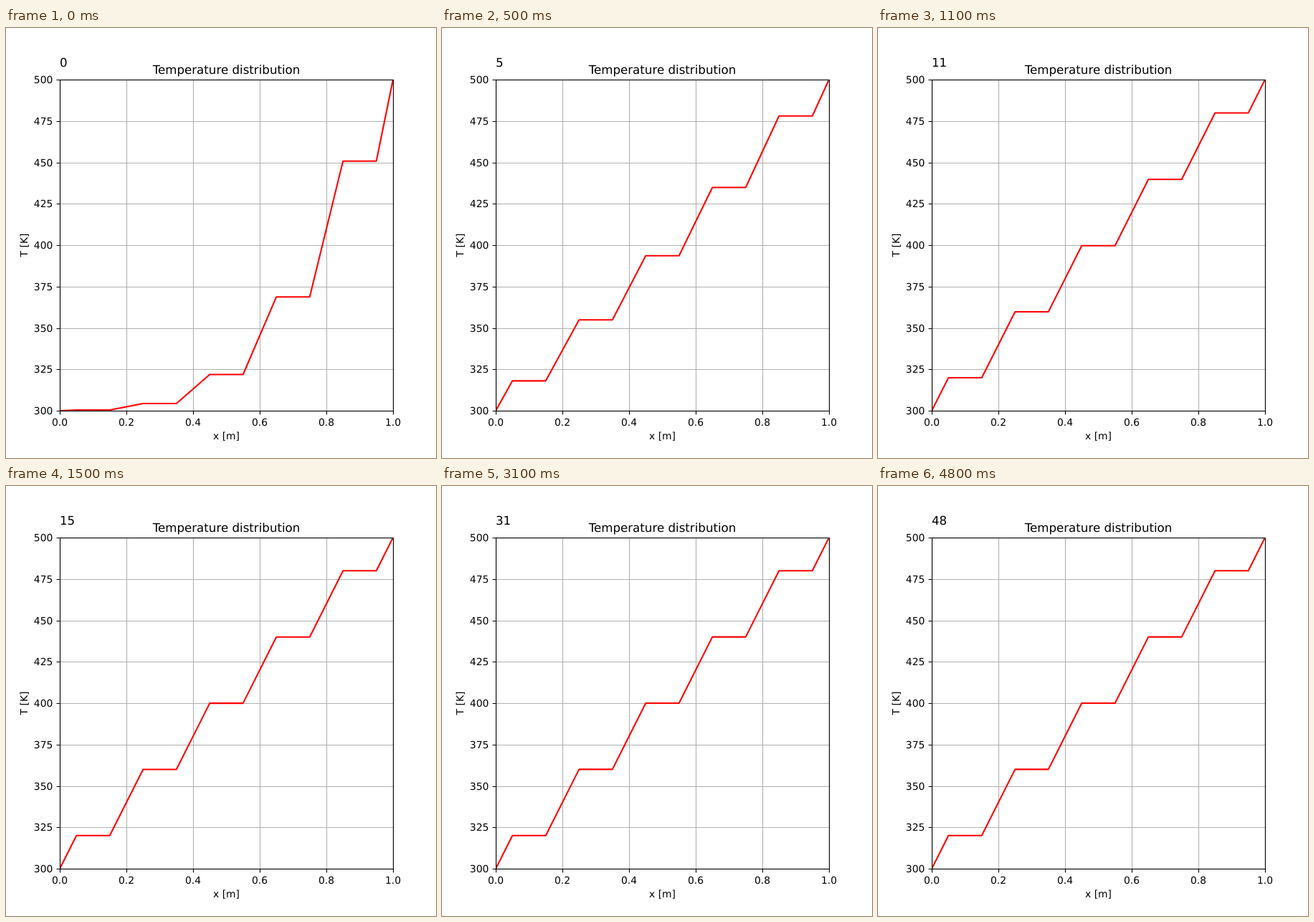
Write an HTML page that moves like this. It is 600x600 px and loops after 4.9 s.

```html
<!DOCTYPE html>
<html lang="en">
<head>
<meta charset="utf-8">
<title>Temperature distribution</title>
<style>
  html, body { margin: 0; width: 100%; height: 100%; overflow: hidden; background: #fff; }
  svg { display: block; width: 100%; height: 100%; }
  text { font-family: "DejaVu Sans", Verdana, sans-serif; font-size: 13.889px; fill: #000; text-rendering: geometricPrecision; }
  .big { font-size: 16.667px; }
  .mid { text-anchor: middle; }
  .end { text-anchor: end; }
  .grid, .axis { fill: none; stroke-width: 1.111; }
  .grid { stroke: #b0b0b0; }
  .axis { stroke: #000; }
  #curve { fill: none; stroke: #f00; stroke-width: 2.083; stroke-linejoin: round; stroke-linecap: square; }
</style>
</head>
<body>
<svg viewBox="0 0 600 600">
  <clipPath id="area"><rect x="75" y="72" width="465" height="462"/></clipPath>
  <g clip-path="url(#area)">
    <path id="grid" class="grid"/>
    <polyline id="curve"/>
  </g>
  <path id="ticks" class="axis"/>
  <rect class="axis" x="75.5" y="72.5" width="465" height="462"/>
  <g id="labels"></g>
  <text class="big mid" x="307.5" y="64">Temperature distribution</text>
  <text class="mid" x="307.5" y="574">x [m]</text>
  <text class="mid" transform="translate(30 303) rotate(-90)">T [K]</text>
  <text class="big" id="count" x="75" y="54">0</text>
</svg>
<script>
const LEFT = 75, RIGHT = 540, TOP = 72, BOTTOM = 534;
const COLD = 300, HOT = 500;
const CELLS = 5, FRAMES = 49, FRAME_MS = 100, STEPS = 5, RATE = 0.25;

const byId = id => document.getElementById(id);
const px = x => LEFT + (RIGHT - LEFT) * x;
const py = T => BOTTOM - (BOTTOM - TOP) * (T - COLD) / (HOT - COLD);
const snap = v => Math.floor(v + 0.5) + 0.5;

function addLabel(text, x, y, cls) {
  const node = document.createElementNS("http://www.w3.org/2000/svg", "text");
  node.textContent = text;
  node.setAttribute("x", x);
  node.setAttribute("y", y);
  node.setAttribute("class", cls);
  byId("labels").append(node);
}

function drawAxes() {
  let grid = "", ticks = "";
  for (let i = 0; i <= 5; i++) {
    const x = px(i / 5), sx = snap(x);
    grid += `M${sx} ${TOP}V${BOTTOM}`;
    ticks += `M${sx} 534.5V539.5`;
    addLabel((i / 5).toFixed(1), x, 555, "mid");
  }
  for (let T = COLD; T <= HOT; T += 25) {
    const y = py(T), sy = snap(y);
    grid += `M${LEFT} ${sy}H${RIGHT}`;
    ticks += `M75.5 ${sy}H70.5`;
    addLabel(T, 65.3, Math.round(y + 5.2), "end");
  }
  byId("grid").setAttribute("d", grid);
  byId("ticks").setAttribute("d", ticks);
}

// One explicit heat conduction step; the walls lie half a cell away.
function conduct(T) {
  return T.map((t, i) => {
    const west = i > 0 ? T[i - 1] - t : 2 * (COLD - t);
    const east = i < CELLS - 1 ? T[i + 1] - t : 2 * (HOT - t);
    return t + RATE * (west + east);
  });
}

function profile(T) {
  const points = [[0, COLD]];
  T.forEach((t, i) => points.push([(i + 0.25) / CELLS, t], [(i + 0.75) / CELLS, t]));
  points.push([1, HOT]);
  return points.map(([x, t]) => `${px(x).toFixed(2)},${py(t).toFixed(2)}`).join(" ");
}

const curves = [];
let T = Array(CELLS).fill(COLD);
for (let n = 0; n < FRAMES; n++) {
  for (let s = 0; s < STEPS; s++) T = conduct(T);
  curves.push(profile(T));
}

let shown = -1;
function draw() {
  const n = Math.floor(performance.now() / FRAME_MS) % FRAMES;
  if (n !== shown) {
    shown = n;
    byId("curve").setAttribute("points", curves[n]);
    byId("count").textContent = n;
  }
  requestAnimationFrame(draw);
}

drawAxes();
draw();
</script>
</body>
</html>
```
